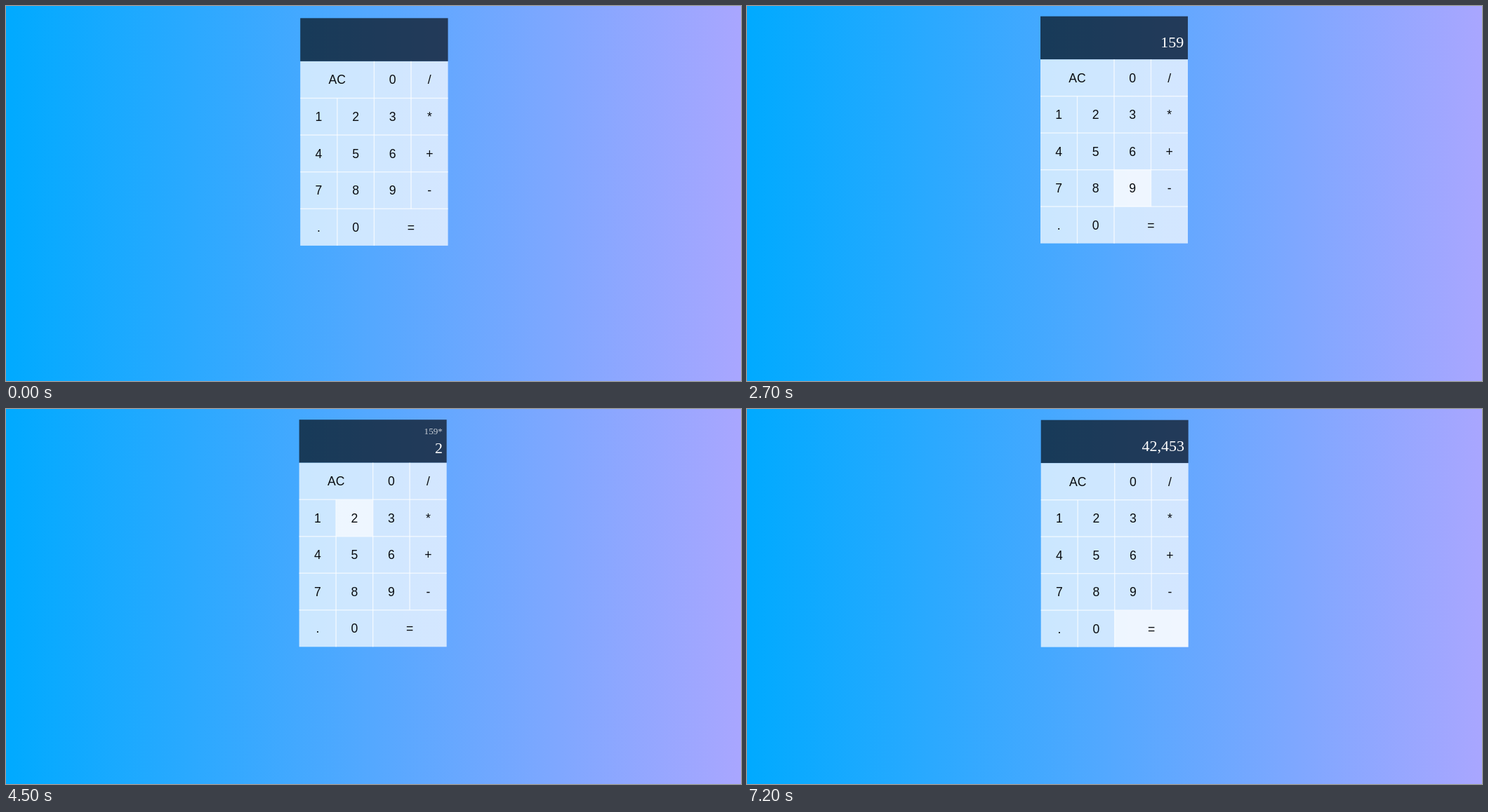
An HTML page with a canvas for the animation above (8100 ms loop, 1047 by 535 pixels).

```html
<!DOCTYPE html>
<html lang="en">
<head>
<meta charset="utf-8">
<title>Calculator</title>
<style>
html, body { margin: 0; width: 100%; height: 100%; overflow: hidden; }
canvas { display: block; }
</style>
</head>
<body>
<canvas id="stage" width="1047" height="535"></canvas>
<script>
const ctx = document.getElementById('stage').getContext('2d');
const STEP = 900, CELL = 52.6, DISPLAY = 61.6, WIDTH = 4 * CELL;

// Each row lists its keys; a span of two columns is written as [label, 2].
const rows = [
  [['AC', 2], '0', '/'],
  ['1', '2', '3', '*'],
  ['4', '5', '6', '+'],
  ['7', '8', '9', '-'],
  ['.', '0', ['=', 2]]
];

// The hand-held view drifts a little with every key press.
const steps = [
  { x: 419.2, y: 17.3, zoom: 1 },
  { x: 418.8, y: 16.8, zoom: 1, key: '1', value: '1' },
  { x: 418.2, y: 15.8, zoom: 1, key: '5', value: '15' },
  { x: 418, y: 14.7, zoom: 0.998, key: '9', value: '159' },
  { x: 417.7, y: 15, zoom: 0.998, key: '*', prior: '159*' },
  { x: 417.6, y: 15.2, zoom: 0.9985, key: '2', prior: '159*', value: '2' },
  { x: 418.5, y: 17.3, zoom: 0.9985, key: '6', prior: '159*', value: '26' },
  { x: 418.6, y: 16.5, zoom: 0.998, key: '7', prior: '159*', value: '267' },
  { x: 418.7, y: 15.7, zoom: 0.998, key: '=', value: '42,453' }
];

const sky = ctx.createLinearGradient(0, 0, 1047, 0);
sky.addColorStop(0, '#00aaff');
sky.addColorStop(1, '#a9a6ff');

function rect(color, x, y, w, h) {
  ctx.fillStyle = color;
  ctx.fillRect(x, y, w, h);
}

function text(label, x, y, font, color, align) {
  ctx.font = font;
  ctx.fillStyle = color;
  ctx.textAlign = align;
  ctx.fillText(label, x, y);
}

function drawDisplay({ prior = '', value = '' }) {
  const serif = '"Liberation Serif", serif', right = WIDTH - 5.8;
  rect('rgba(0,0,0,.65)', 0, 0, WIDTH, DISPLAY);
  text(prior, right, 20.6, '13.2px ' + serif, 'rgba(255,255,255,.75)', 'right');
  text(value, right, prior ? 48.2 : 44.1, '22px ' + serif, '#fff', 'right');
}

function drawKeys(pressed) {
  const line = 'rgba(255,255,255,.8)';
  rows.forEach((row, r) => {
    const y = DISPLAY + r * CELL;
    let x = 0;
    for (const key of row) {
      const [label, span] = Array.isArray(key) ? key : [key, 1];
      const w = span * CELL;
      rect(`rgba(255,255,255,${label === pressed ? 0.9 : 0.72})`, x, y, w, CELL);
      if (x) rect(line, x - 0.65, y, 1.3, CELL);
      text(label, x + w / 2, y + CELL / 2 + 6.2,
        '17.6px "Liberation Sans", sans-serif', '#0a0d10', 'center');
      x += w;
    }
  });
  for (let r = 1; r < rows.length; r++) {
    rect(line, 0, DISPLAY + r * CELL - 0.65, WIDTH, 1.3);
  }
}

function draw() {
  const step = steps[Math.floor(performance.now() / STEP) % steps.length];
  ctx.setTransform(1, 0, 0, 1, 0, 0);
  rect(sky, 0, 0, 1047, 535);
  ctx.setTransform(step.zoom, 0, 0, step.zoom, step.x, step.y);
  drawDisplay(step);
  drawKeys(step.key);
  requestAnimationFrame(draw);
}
draw();
</script>
</body>
</html>
```
